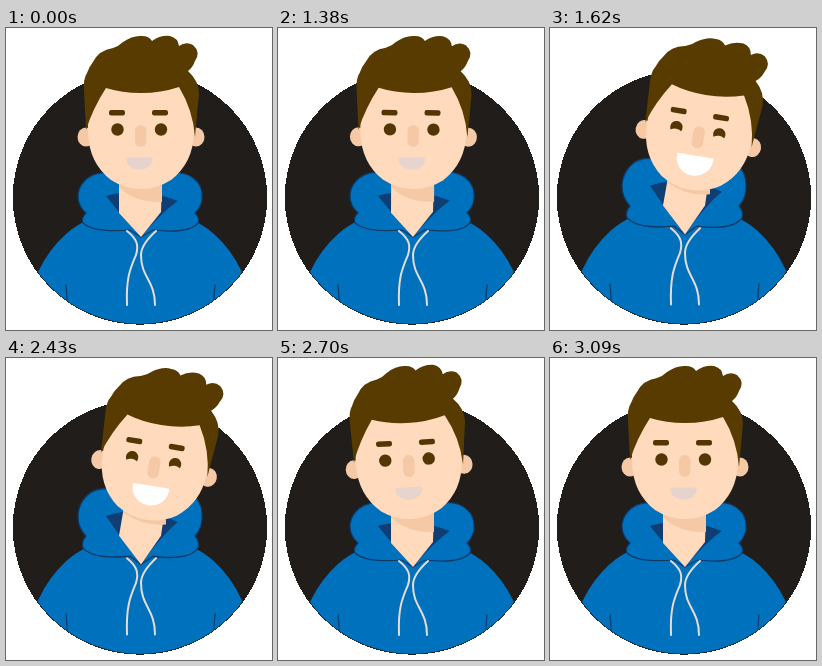
An HTML page that plays this animation: 266 px wide and 302 px high, repeating every 3.63 s.

```html
<!DOCTYPE html>
<html lang="en">
<head>
<meta charset="utf-8">
<title>Smiling avatar</title>
<style>
  html, body { margin: 0; width: 100%; height: 100%; overflow: hidden; background: #fff; }
  svg { display: block; width: 100%; height: 100%; }
  .skin { fill: #ffdabc; }
  .shade { fill: #f5c9a6; }
  .hair { fill: #573b00; }
  .dark { fill: #523604; }
  .blue { fill: #0071bd; }
  .navy { fill: #103d72; }
  .seam { stroke: #123a66; stroke-width: 1.2; }
  .line { fill: none; stroke-linecap: round; stroke-linejoin: round; }
  .cord { stroke: #e6dcd6; stroke-width: 2; }
</style>
</head>
<body>
<svg viewBox="0 0 266 302">
  <clipPath id="disc"><circle cx="134" cy="169.5" r="126.5"/></clipPath>
  <circle cx="134" cy="169.5" r="127.2" fill="#201d1b" shape-rendering="crispEdges"/>
  <g clip-path="url(#disc)">
    <g id="body">
      <path class="blue" d="M20 300L32 244Q43 221 60 206Q70 197 82 192H186Q198 197 208 206Q225 221 236 244L250 300Z"/>
      <path class="line seam" d="M60 257Q62 275 61 300M209 257Q207 275 208 300"/>
      <g id="hood">
        <path class="blue seam" d="M112 150C98 138 73 148 72 168Q72 178 80 185Q75 190 77 195Q88 205 124 202L135 209L147 202Q183 206 192 195Q194 190 189 185Q197 178 196 166C195 148 172 138 156 150Z"/>
        <path class="navy" d="M100 168Q134 158 172 173Q157 183 135 209Q115 187 100 168Z"/>
      </g>
      <path id="neck" class="skin"/>
      <path id="neckShade" class="shade"/>
      <path class="line cord" d="M121 203C131 211 133 217 130 227C124 241 120 250 121 277M150 203C140 212 135 219 135 227C135 250 149 252 149 277"/>
    </g>
  </g>

  <g id="head">
    <g class="shade">
      <ellipse cx="80" cy="109" rx="8.5" ry="9.5"/>
      <ellipse cx="190" cy="109" rx="8.5" ry="9.5"/>
    </g>
    <path class="skin" d="M81 55H189L188 105Q187 135 165 152Q151 161 135 161Q119 161 105 152Q83 135 82 105Z"/>
    <path class="hair" d="M80 102L78 63Q77 51 81 45Q83 39 87 34Q93 22 107 20Q113 18 117 14Q127 7 136 8Q143 8 146 13Q154 7 164 8Q172 10 173 18Q180 13 187 17Q195 24 189 33Q187 39 182 43Q193 53 193 66L189 109Q187 82 173 59Q155 65 135 65Q116 65 100 60Q87 80 80 102Z"/>
    <rect class="dark" x="103" y="82" width="16" height="5.5" rx="2.2"/>
    <rect class="dark" x="146" y="82" width="16" height="5.5" rx="2.2"/>
    <g id="eyes" class="dark">
      <ellipse cx="111.5" cy="101.5" rx="6.2"/>
      <ellipse cx="155" cy="101.5" rx="6.2"/>
    </g>
    <g id="lids" class="skin">
      <ellipse cx="111.5" rx="7" ry="5"/>
      <ellipse cx="155" rx="7" ry="5"/>
    </g>
    <rect class="shade" x="129" y="97" width="11.5" height="22" rx="5.7"/>
    <path id="mouth" stroke-width="2" stroke-linejoin="round"/>
  </g>
</svg>
<script>
const LOOP = 3630, STEP = 30;
const $ = id => document.getElementById(id);
const mix = (a, b, k) => a + (b - a) * k;
const progress = (t, from, to) => Math.min(1, Math.max(0, (t - from) / (to - from)));
const ease = (t, from, to) => (1 - Math.cos(Math.PI * progress(t, from, to))) / 2;
const transform = (id, value) => $(id).setAttribute('transform', value);
const stretch = (id, base, k) => transform(id, `translate(0 ${base * (1 - k)}) scale(1 ${k})`);

const TILT = 9.5, BACKSWING = -4.5;

// Lean right, swing back past the middle, then settle.
function tiltAt(t) {
  if (t < 2400) return TILT * ease(t, 1350, 1620);
  if (t < 2790) return mix(TILT, BACKSWING, ease(t, 2400, 2790));
  return mix(BACKSWING, 0, ease(t, 2790, 3090));
}

function draw(t) {
  const tilt = tiltAt(t);
  const lean = Math.max(0, tilt / TILT);
  const smile = ease(t, 1350, 1620) - ease(t, 2400, 2740);
  const blink = Math.sin(Math.PI * progress(t, 400, 600));
  const p = (a, b) => mix(a, b, lean).toFixed(2);

  transform('head', `rotate(${tilt} 133 190)`);
  stretch('body', 296, 1 + 0.03 * lean);
  stretch('hood', 209, 1 + 0.15 * lean);

  $('neck').setAttribute('d', `M${p(113, 119)} 148H${p(156, 160)}L155 ${p(184, 181)}L135 209L113 ${p(185, 181)}Z`);
  $('neckShade').setAttribute('d', `M${p(113, 119)} 150H${p(156, 160)}V${p(174, 170)}Q${p(129, 137)} ${p(175, 172)} ${p(113, 118)} 159Z`);

  for (const eye of $('eyes').children) eye.setAttribute('ry', 6.2 * (1 - 0.88 * blink));
  for (const lid of $('lids').children) lid.setAttribute('cy', 113 - 5 * smile);

  const x = mix(133.5, 135, smile), w = mix(12.2, 17.5, smile);
  const top = mix(130.5, 127.5, smile), h = mix(13.5, 24, smile);
  const color = `rgb(${[230, 211, 205].map(c => Math.round(mix(c, 255, smile)))})`;
  const mouth = $('mouth');
  mouth.setAttribute('d', `M${x - w} ${top}H${x + w}C${x + w} ${top + h} ${x - w} ${top + h} ${x - w} ${top}Z`);
  mouth.setAttribute('fill', color);
  mouth.setAttribute('stroke', color);
}

const start = performance.now();
function frame() {
  const t = (performance.now() - start) % LOOP;
  draw(Math.floor(t / STEP) * STEP);
  requestAnimationFrame(frame);
}
frame();
</script>
</body>
</html>
```
